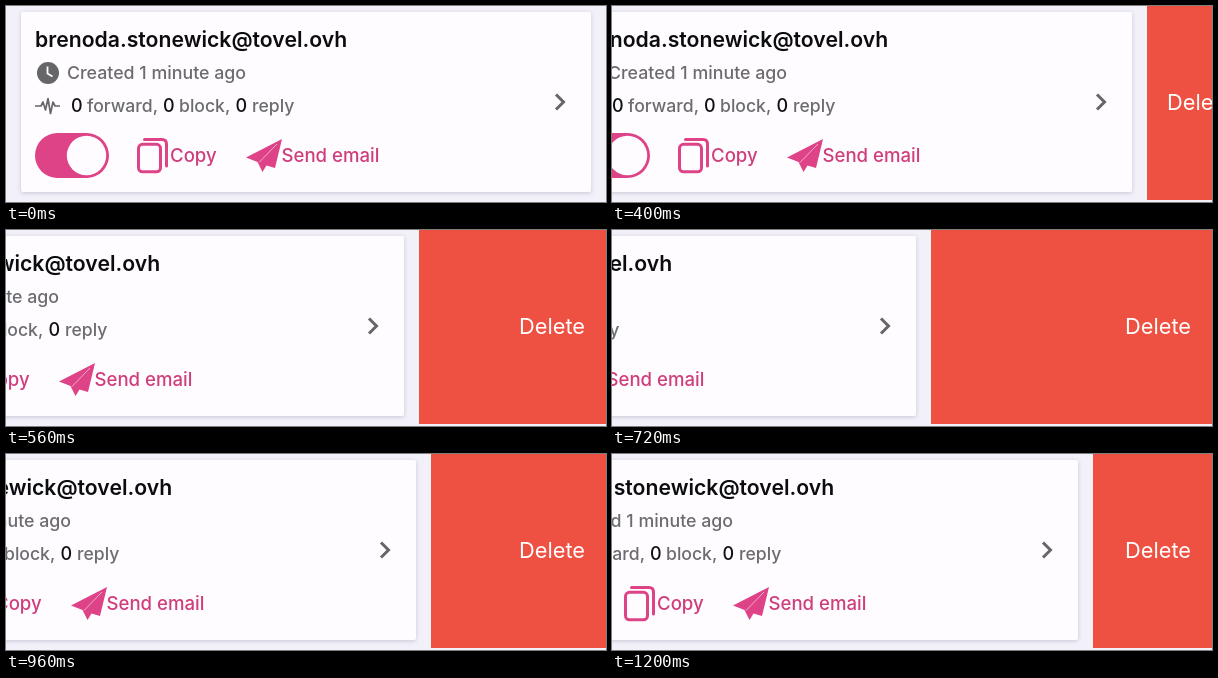
Recreate the animation shown at these times as an HTML page. Size 600 by 196 pixels, loop 1240 ms.

```html
<!DOCTYPE html>
<html lang="en">
<head>
<meta charset="utf-8">
<title>Swipe to delete</title>
<style>
  html, body { margin: 0; width: 100%; height: 100%; overflow: hidden; background: #f2f0f8; }
  svg { display: block; width: 600px; height: 196px; font: 500 17.6px Inter, "Open Sans", sans-serif; }
  .card { fill: #fefcff; filter: drop-shadow(0 1px 2px rgba(60, 50, 90, .22)); }
  .title { font-size: 21.2px; font-weight: 600; fill: #0c0b10; }
  .muted { fill: #6c6b70; }
  .age { font-size: 17.8px; }
  .count { font-size: 18px; fill: #111015; }
  .action { font-size: 18.6px; fill: #cf3d7c; }
  .pink { fill: #de4387; }
  .line { fill: none; stroke: #66656a; }
  .copy { fill: none; stroke: #de4387; stroke-width: 3; stroke-linecap: round; }
  .delete { font-size: 21.8px; font-weight: 400; fill: #fff; }
</style>
</head>
<body>
<svg viewBox="0 0 600 196">
  <rect width="600" height="196" fill="#f2f0f8"/>
  <g id="row">
    <rect class="card" x="15" y="6" width="570" height="180" rx="2"/>
    <text class="title" x="29" y="41">brenoda.stonewick@tovel.ovh</text>

    <circle cx="42" cy="67" r="11" fill="#66656a"/>
    <path d="M41.5 60.5V67.5L46.5 70.5" fill="none" stroke="#fefcff" stroke-width="1.8"/>
    <text class="muted age" x="61" y="73">Created 1 minute ago</text>

    <path class="line" stroke-width="1.7" stroke-linejoin="round" d="M29 100H35L37 96L39.5 104L42 92.5L44.5 107.5L47 96L49 100H54"/>
    <text class="muted" y="106"><tspan class="count" x="65">0</tspan><tspan x="81">forward,</tspan><tspan class="count" x="157">0</tspan><tspan x="173">block,</tspan><tspan class="count" x="229.5">0</tspan><tspan x="246">reply</tspan></text>

    <rect class="pink" x="29" y="127" width="74" height="45" rx="22.5"/>
    <circle cx="80.5" cy="149.5" r="19.7" fill="#fefcff"/>

    <rect class="copy" x="132.5" y="138.3" width="22" height="27.5" rx="4"/>
    <path class="copy" d="M138.5 133.4H156Q160.5 133.4 160.5 138V160"/>
    <text class="action" x="164" y="156">Copy</text>

    <path class="pink" d="M276 133L240 151.5L251.5 156L256.5 166L260.5 159.5L269 162Z"/>
    <path d="M253 156.5L271 138" fill="none" stroke="#f6c6dc" stroke-width=".8"/>
    <text class="action" x="275.5" y="156">Send email</text>

    <path class="line" stroke-width="3" d="M550 88.5L557.5 96L550 103.5"/>
  </g>
  <rect id="back" y="0" width="600" height="194" fill="#ee5142"/>
  <text id="label" class="delete" y="104">Delete</text>
</svg>
<script>
  const LOOP = 1240, STEP = 40;
  const RELEASE = 756.5, PEAK = 281, REST = 108.6, RATE = 0.01025;
  // Finger drag: time, distance, speed
  const DRAG = [[400, 65, 0.52], [560, 187, 0.78], [720, PEAK, 0.1]];
  const [row, back, label] = ["row", "back", "label"].map(id => document.getElementById(id));

  function hermite([t0, p0, v0], [t1, p1, v1], t) {
    const d = t1 - t0, u = (t - t0) / d, w = 1 - u;
    return w * w * ((1 + 2 * u) * p0 + u * d * v0) +
           u * u * ((1 + 2 * w) * p1 - w * d * v1);
  }

  function swipe(t) {
    if (t <= 400) return 65 * (t / 400) ** 3;
    if (t <= 560) return hermite(DRAG[0], DRAG[1], t);
    if (t <= 720) return hermite(DRAG[1], DRAG[2], t);
    if (t <= RELEASE) return PEAK;
    // Critically damped spring back to the open position
    const s = RATE * (t - RELEASE);
    return REST + (PEAK - REST) * (1 + s) * Math.exp(-s);
  }

  function draw(now) {
    const t = Math.floor((now % LOOP) / STEP) * STEP;
    const x = Math.round(swipe(t));
    row.setAttribute("transform", `translate(${-x} 0)`);
    back.setAttribute("x", 600 - x);
    label.setAttribute("x", Math.max(513, 620 - x));
  }

  const start = performance.now();
  function tick() {
    draw(performance.now() - start);
    requestAnimationFrame(tick);
  }
  tick();
</script>
</body>
</html>
```
